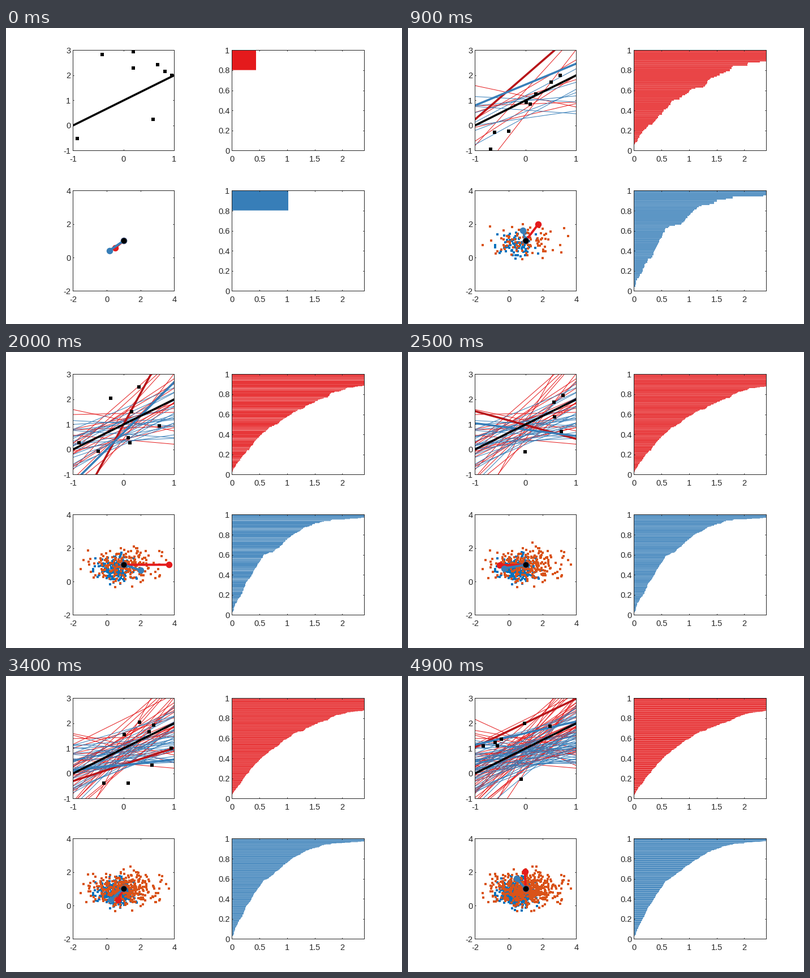
Recreate the animation shown at these times as a matplotlib script. Size 700 by 525 pixels, loop 5 s.

```python
import matplotlib.pyplot as plt
import numpy as np
from matplotlib.animation import FuncAnimation
from matplotlib.collections import LineCollection
from matplotlib.colors import to_rgb

W, H, DPI = 700, 525, 100
PX = 72 / DPI
FRAMES, STEP = 50, 10
TOTAL = STEP * (FRAMES - 1) + 1
RED, BLUE, DARK_RED = "#e41a1c", "#377eb8", "#b81519"
DOT_BLUE, DOT_ORANGE, INK = "#0072bd", "#d95319", "#262626"

plt.rcParams.update({"font.family": "Liberation Sans", "font.size": 14.67 * PX,
                     "axes.unicode_minus": False})
rng = np.random.default_rng(12)

# Fitted (slope, intercept) pairs: evenly spread normal draws around the true
# values (1, 1) for least squares, and shrunk towards zero for ridge.
u, v = ((np.arange(TOTAL)[:, None] * (0.7549, 0.5698)
         + rng.normal(0, 0.04, (TOTAL, 2))) % 1).T
radius = np.sqrt(-2 * np.log(np.maximum(1 - u, 0.025)))
angle = 2 * np.pi * v
ols = 1 + np.column_stack([radius * np.cos(angle), 0.5 * radius * np.sin(angle)])
ridge = ols * (0.5, 0.78) + rng.normal(0, (0.12, 0.08), (TOTAL, 2))
ols[0], ridge[0] = (0.49, 0.57), (0.17, 0.42)


def samples(k):
    """Noisy points around y = 1 + x that fall inside the panel."""
    r = np.random.default_rng(100 + k)
    x = r.uniform(-1, 1, 8)
    y = 1 + x + r.normal(0, 1, 8)
    keep = (y > -1) & (y < 3)
    return x[keep], y[keep]


def line_ends(fits):
    """Heights of the fitted lines at x = -1 and x = 1."""
    slope, icept = fits.T
    return [[(-1, c - m), (1, c + m)] for m, c in zip(slope, icept)]


def sorted_errors(fits):
    errors = ((fits - 1) ** 2).sum(axis=1)
    return np.concatenate([[0, 0], np.sort(errors)])


ROWS, COLS, SUB = 178, 234, 8
sub_y = 1 - (np.arange(ROWS * SUB) + 0.5) / (ROWS * SUB)
col_x = (np.arange(COLS) + 0.5) / COLS * 2.4


def bar_coverage(errors):
    """Antialiased bars at heights i/n, each 0.8/n thick."""
    pos = sub_y * (len(errors) - 1)
    i = np.rint(pos).astype(int)
    length = np.where(np.abs(pos - i) <= 0.4, errors[i], -1)
    hit = length[:, None] > col_x
    return hit.reshape(ROWS, SUB, COLS).mean(axis=1)


fig = plt.figure(figsize=(W / DPI, H / DPI), dpi=DPI, facecolor="white")


def panel(left, top, width, xlim, ylim, xticks, yticks):
    ax = fig.add_axes([left / W, 1 - (top + ROWS) / H, width / W, ROWS / H])
    ax.set(xlim=xlim, ylim=ylim)
    ax.set_xticks(xticks, [f"{t:g}" for t in xticks])
    ax.set_yticks(yticks, [f"{t:g}" for t in yticks])
    ax.tick_params(direction="in", length=2 * PX, width=PX, color=INK,
                   labelcolor=INK, top=True, right=True)
    ax.tick_params(axis="x", pad=8.3 * PX)
    ax.tick_params(axis="y", pad=4 * PX)
    for spine in ax.spines.values():
        spine.set(linewidth=PX, color=INK)
    return ax


LEFT, RIGHT, TOP, BOTTOM = 118.4, 399.4, 39.4, 288.4


def bar_panel(top, color):
    ax = panel(RIGHT, top, COLS, (0, 2.4), (0, 1),
               [0, 0.5, 1, 1.5, 2], [0, 0.2, 0.4, 0.6, 0.8, 1])
    rgba = np.zeros((ROWS, COLS, 4))
    rgba[..., :3] = to_rgb(color)
    image = ax.imshow(rgba, extent=(0, 2.4, 0, 1), aspect="auto",
                      interpolation="nearest", zorder=1)
    return image, rgba


fit_ax = panel(LEFT, TOP, 179, (-1, 1), (-1, 3), [-1, 0, 1], range(-1, 4))
est_ax = panel(LEFT, BOTTOM, 179, (-2, 4), (-2, 4),
               range(-2, 5, 2), range(-2, 5, 2))


def thin_lines(color):
    return fit_ax.add_collection(
        LineCollection([], colors=color, linewidths=PX, zorder=1), autolim=False)


def thick_line(color, z):
    return fit_ax.plot([], [], color=color, lw=3.6 * PX, zorder=z)[0]


def cloud(color, z):
    return est_ax.plot([], [], "s", color=color, ms=3.2 * PX, mew=0, zorder=z)[0]


def arm(color, z):
    return est_ax.plot([], [], "o-", color=color, lw=4 * PX, ms=11.5 * PX,
                       mew=0, zorder=z)[0]


class Estimator:
    """Everything drawn for one fitting method."""

    def __init__(self, fits, color, thick_color, dot_color, top, z):
        self.fits = fits
        self.thin = thin_lines(color)
        self.thick = thick_line(thick_color, 2 + z)
        self.dots = cloud(dot_color, 1.5 - z)
        self.arm = arm(color, 2 + z)
        self.image, self.rgba = bar_panel(top, color)

    def show(self, k):
        fits = self.fits[:STEP * k + 1]
        lines = line_ends(fits[STEP::STEP])
        self.thin.set_segments(lines)
        self.thick.set_data(*(zip(*lines[-1]) if lines else ([], [])))
        cloud_x, cloud_y = fits.T if k else ([], [])
        self.dots.set_data(cloud_x, cloud_y)
        self.arm.set_data(*zip((1, 1), fits[-1]))
        self.rgba[..., 3] = bar_coverage(sorted_errors(fits))
        self.image.set_data(self.rgba.copy())


methods = [Estimator(ols, RED, DARK_RED, DOT_ORANGE, TOP, 0),
           Estimator(ridge, BLUE, BLUE, DOT_BLUE, BOTTOM, 0.1)]

thick_line("black", 2.5).set_data([-1, 1], [0, 2])
squares = fit_ax.plot([], [], "s", color="black", ms=5.5 * PX, mew=0,
                      zorder=3, clip_on=False)[0]
est_ax.plot(1, 1, "o", color="black", ms=10 * PX, mew=0, zorder=3)


def update(k):
    squares.set_data(*samples(k))
    for method in methods:
        method.show(k)
    return ()


anim = FuncAnimation(fig, update, frames=FRAMES, interval=100,
                     init_func=lambda: update(0), repeat=True, repeat_delay=0)
plt.show()
```
